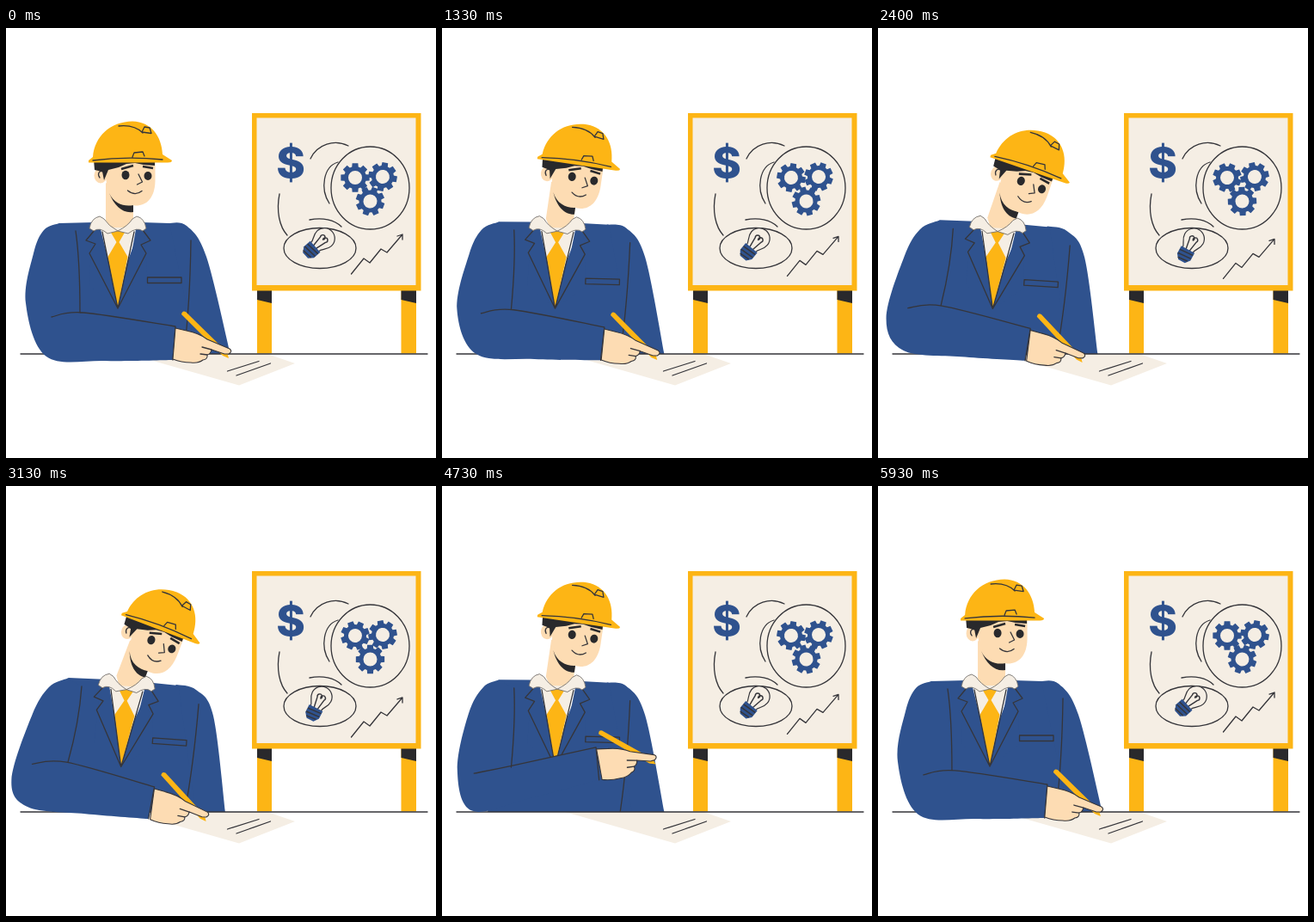
These frames come from a looping animation (500x500 px, 5.99 s). An HTML page:

```html
<!DOCTYPE html>
<html lang="en">
<head>
<meta charset="utf-8">
<title>Engineer at a desk</title>
<style>
html, body { margin: 0; width: 100%; height: 100%; overflow: hidden; background: #fff; }
svg { display: block; width: 100%; height: 100%; }
.line { fill: none; stroke: #35353a; stroke-width: 1.3; stroke-linecap: round; stroke-linejoin: round; }
.edge { stroke: #35353a; stroke-width: 1.1; stroke-linejoin: round; }
.soft { stroke: #77736f; stroke-width: .9; stroke-linejoin: round; }
.blue { fill: #2f528e; }
.gold { fill: #fdb515; }
.cream { fill: #f5eee4; }
.skin { fill: #fddcb3; }
.dark { fill: #29292c; }
.dollar { font: 800 51px Inter, Arial, sans-serif; text-anchor: middle; }
</style>
</head>
<body>
<svg viewBox="0 0 500 500">
  <defs>
    <clipPath id="aboveDesk"><rect width="500" height="379"/></clipPath>
    <path id="gear" class="blue" fill-rule="evenodd"/>
  </defs>

  <g id="board">
    <path class="gold" d="M292 304h17v74.500h-17zM459.500 304h17.500v74.500h-17.500z"/>
    <path class="dark" d="M292 304h17v16l-17-4zM459.500 304h17.500v16l-17.500-4z"/>
    <rect class="gold" x="286" y="99" width="196.500" height="206.500"/>
    <rect class="cream" x="291.500" y="104.500" width="185" height="194.500"/>
    <text class="blue dollar" x="331" y="175">$</text>
    <g class="line">
      <path d="M354 152C362 135 382 129 398 137"/>
      <path d="M386 156C369 161 365 187 376 204"/>
      <path d="M318 193C314 213 318 231 327 241"/>
      <path d="M353 223C368 220 382 223 390 231"/>
      <ellipse cx="423.500" cy="186" rx="45.500" ry="48"/>
      <ellipse cx="365" cy="256" rx="42" ry="23.500"/>
    </g>
    <g id="gears"></g>
    <g id="bulb">
      <path class="cream edge" d="M-6 4C-6 -1 -11 -3 -11 -10A11 11 0 0 1 11 -10C11 -3 6 -1 6 4Z"/>
      <path class="line" d="M-2 4L-4 -8M2 4L4 -8M-4 -8a2.500 2.500 0 1 1 4 0a2.500 2.500 0 1 1 4 0"/>
      <path class="blue" d="M-8 3H8V12L4 17H-4L-8 12Z"/>
      <path class="line" d="M-7 7L7 6M-7 11L7 10M-5 15L5 14"/>
    </g>
    <path id="chart" class="line" d="M401.500 286L416 268L423 273L436 257L443 261L461 240M455 242L461 240L461 246"/>
  </g>

  <path class="cream" d="M143 379H304L336 390L271 415.500Z"/>
  <path class="line" d="M257.500 399L294 387.500M268 404L307.500 390"/>

  <g id="head">
    <path class="skin" d="M116 180V224L131 246L148 224V200Z"/>
    <path class="dark" d="M120 192C126 205 138 208 148 206V214C136 216 126 207 120 192Z"/>
    <path class="skin" d="M114 156H173.500V178C173 198 163 207 150 206.500C132 205 121 196 117 181Z"/>
    <ellipse class="skin" cx="110" cy="171.500" rx="7.500" ry="9"/>
    <path class="line" d="M113 167C108 165 106 170 109 174"/>
    <path class="dark" d="M102 153H173V160L160 159L150 157L140 158L131 162L119 165L114 177L112 167L103 165Z"/>
    <path d="M134 164L148 160M159 161L171 163" fill="none" stroke="#29292c" stroke-width="2.600"/>
    <ellipse class="dark" cx="139" cy="171" rx="4.500" ry="5.200"/>
    <ellipse class="dark" cx="165" cy="172" rx="4.500" ry="5"/>
    <path class="line" d="M154 170L158.500 179L152.500 182M141.500 189Q150 196 158 189.500"/>
    <path class="gold" d="M101 150C103 126 121 109 147 108.500C169 109 181 126 182 147L193 154Q193 156.500 188 156.500L96 156.500V154Z"/>
    <path class="line" d="M131 114Q149 112 159 122M158 121L161 115L167 116L169 122.500L158 121M101 154Q140 149 182 153M147 150L149 145L159 144L161 149"/>
  </g>

  <g clip-path="url(#aboveDesk)">
    <path id="side" class="blue"/>
    <g id="torso">
      <path class="blue" d="M62 227L102 226L131 300L158 226L190 227L225 396H55L44 300Q40 240 62 227Z"/>
      <path class="blue" d="M100 226L110 234L117 262L130 326L97 300ZM160 226L151 234L146 262L130 326L165 300Z"/>
      <path class="cream" d="M112 232H149L130 326Z"/>
      <path class="gold" d="M121 236H139L131.500 249L141.500 266L130 325L118.500 266L128.500 249Z"/>
      <path class="line" d="M103 235L93 247L104 251L97 262L130 326L163 262L157 252L168 247L159 235M112 237L130 326L149 237"/>
      <path class="cream soft" d="M97 233Q99 221 109 219L114 222Q119 230 130 236L118 239Q109 231 102 236ZM163 233Q161 221 152 219L147 222Q142 230 130 236L142 239Q152 231 159 236Z"/>
      <path class="line" d="M164.500 290H204V296.500H164.500ZM215 247Q214 320 207 378"/>
    </g>
  </g>

  <path class="line" d="M17 379H490"/>
  <path id="sleeve" class="blue"/>
  <path id="folds" class="line"/>
  <g id="hand">
    <path class="gold" d="M7 -14Q8 -19 12 -17L60 30L62 37L55 34Z"/>
    <path class="skin edge" d="M0 2L13 5Q28 8 37 15L63 26Q67 29 62 32L57 32L42 27Q41 32 37 33Q38 38 32 39Q27 43 18 42Q7 42 -3 38Z"/>
    <path class="line" d="M42 27L31 24M37 33L29 32"/>
  </g>
</svg>
<script>
const LOOP = 5990, STEPS = 60;
const $ = id => document.getElementById(id);
const lerp = (a, b, t) => a + (b - a) * t;
const mix = (a, b, t) => a.map((v, i) => lerp(v, b[i], t));
const clamp = t => Math.min(1, Math.max(0, t));
const ease = t => t * t * (3 - 2 * t);
const move = (el, value) => el.setAttribute('transform', value);

// Arm points: upright place, leaning place, shift when the hand is lifted
const ARM = {
  upper: [[44, 235], [50, 234], [0, 0]],
  side: [[32, 262], [30, 267], [0, 0]],
  elbow: [[23, 320], [6, 342], [5, -3]],
  corner: [[47, 382], [25, 373], [1, 1]],
  under: [[115, 387], [92, 381], [0, -20]],
  cuffLow: [[194, 386], [165, 387], [6, -45]],
  cuffTop: [[197, 347], [172, 350], [-3, -45]],
  crease: [[90, 331], [70, 321], [4, 0]],
  creaseEnd: [[53, 336], [30, 323], [-2, 6]]
};

// Far side of the jacket, upright and leaning
const SIDE = [
  [[188, 227], [198, 231]], [[210, 230], [221, 237]],
  [[233, 266], [241, 267]], [[261, 380], [255, 380]]
];

// Smooth curve commands through points, starting from the first
function curve(pts) {
  let d = '';
  for (let i = 0; i < pts.length - 1; i++) {
    const a = pts[i], b = pts[i + 1], before = pts[i - 1] || a, after = pts[i + 2] || b;
    const c1 = a.map((v, n) => v + (b[n] - before[n]) / 6);
    const c2 = b.map((v, n) => v - (after[n] - a[n]) / 6);
    d += `C${c1} ${c2} ${b}`;
  }
  return d;
}

function gearPath(teeth = 8) {
  const pts = [];
  for (let i = 0; i < teeth; i++) {
    for (const [r, off] of [[13, -0.29], [17, -0.2], [17, 0.2], [13, 0.29]]) {
      const a = i * 2 * Math.PI / teeth + off;
      pts.push((r * Math.cos(a)).toFixed(2) + ' ' + (r * Math.sin(a)).toFixed(2));
    }
  }
  return `M${pts.join('L')}ZM8 0A8 8 0 1 0 -8 0A8 8 0 1 0 8 0Z`;
}

$('gear').setAttribute('d', gearPath());
const gears = [[406, 174], [438, 173], [423.5, 201.5]].map(([x, y], i) => {
  const el = document.createElementNS('http://www.w3.org/2000/svg', 'use');
  el.setAttribute('href', '#gear');
  $('gears').append(el);
  return { el, x, y, turn: 10 * i };
});

function drawBoard(lean) {
  move($('bulb'), `translate(362 ${lerp(252, 255, lean)}) rotate(${lerp(48, 27, lean)}) scale(1.1)`);
  move($('chart'), `translate(0 ${6 * lean})`);
  for (const g of gears) move(g.el, `translate(${g.x} ${g.y}) rotate(${g.turn + 25 * lean})`);
}

function drawBody(lean) {
  move($('head'), `rotate(${21 * lean} 132 256)`);
  move($('torso'), `rotate(${4 * lean} 125 380)`);
  const side = SIDE.map(([a, b]) => mix(a, b, lean));
  $('side').setAttribute('d', `M${side[0]}${curve(side)}H130V300Z`);
}

// reach: 0 at the right end of the writing, 1 at the left; lift: hand off the paper
function drawArm(lean, reach, lift) {
  const at = {};
  for (const name in ARM) {
    const [up, leaning, raise] = ARM[name];
    at[name] = mix(up, leaning, reach).map((v, i) => v + raise[i] * lift);
  }
  const shoulder = mix([62, 227], [72, 223.5], lean);
  const seamTop = mix([81, 236], [88, 233], lean);
  const seamMid = mix([86, 270], [85, 275], lean);
  const seamEnd = mix([86, 331], [72, 321], lean);
  const outline = [shoulder, at.upper, at.side, at.elbow, at.corner, at.under, at.cuffLow];
  $('sleeve').setAttribute('d',
    `M${shoulder}${curve(outline)}L${at.cuffTop}L${at.crease}L${seamEnd}L${seamTop}Z`);
  $('folds').setAttribute('d',
    `M${at.cuffLow}L${at.cuffTop}${curve([at.cuffTop, at.crease, at.creaseEnd])}M${seamTop}Q${seamMid} ${seamEnd}`);
  move($('hand'), `translate(${at.cuffTop}) rotate(${3 * reach - 17 * lift})`);
}

function draw(k) {
  const lean = (1 - Math.cos(2 * Math.PI * k / STEPS)) / 2;
  const reach = ease(clamp(k / 34)) - ease(clamp((k - 37) / 23));
  const lift = Math.sin(Math.PI * clamp((k - 35.5) / 21.5)) ** 0.6 || 0;
  drawBoard(lean);
  drawBody(lean);
  drawArm(lean, reach, lift);
}

// Poses change at 0 and 130 ms of every 200 ms
function tick() {
  const t = performance.now() % LOOP;
  draw(2 * Math.floor(t / 200) + (t % 200 >= 130 ? 1 : 0));
  requestAnimationFrame(tick);
}
tick();
</script>
</body>
</html>
```
